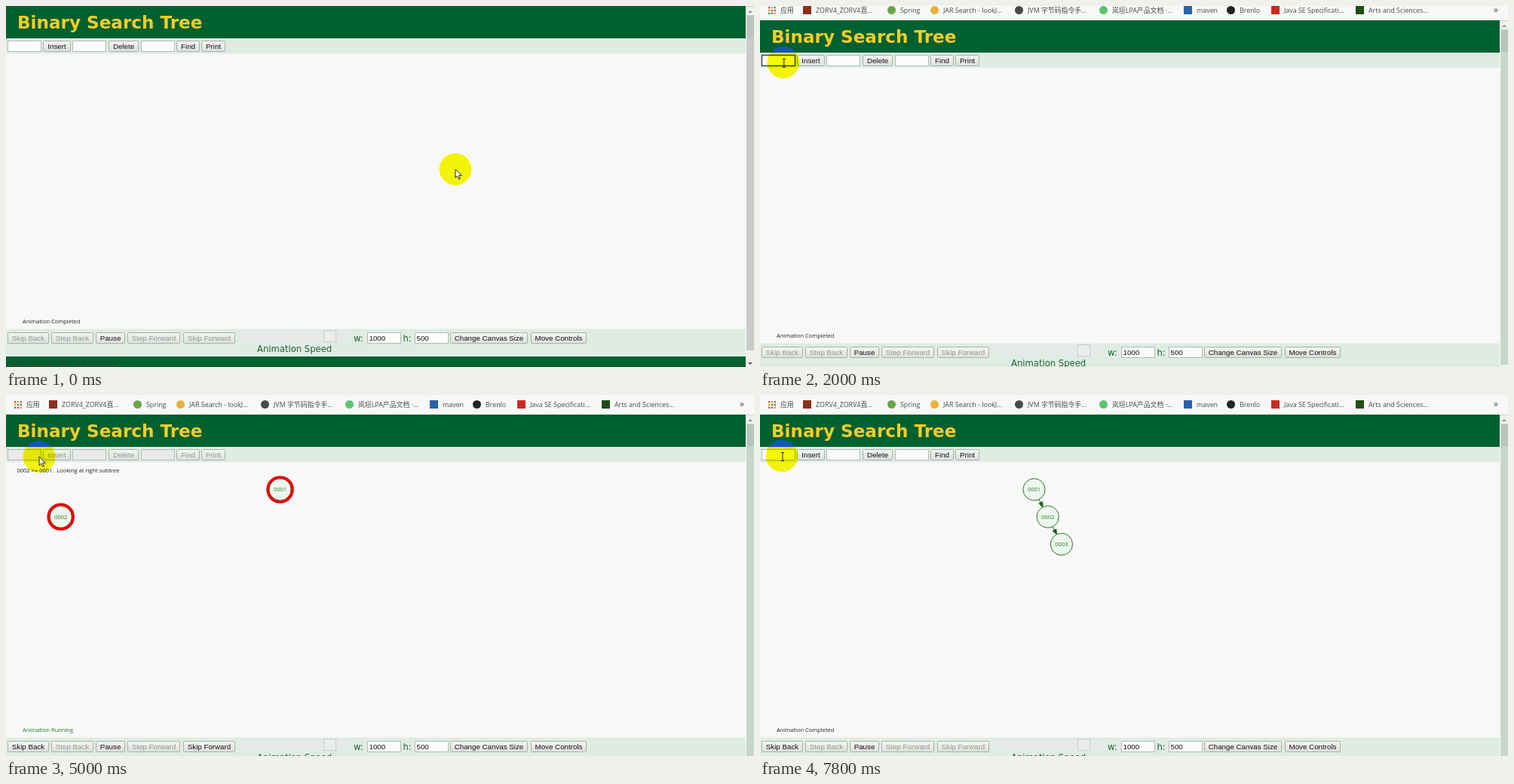
Animation, 992 px wide and 480 px high, one loop 8 s. Source, as an HTML page:

```html
<!DOCTYPE html>
<html lang="en">
<head>
<meta charset="utf-8">
<title>Binary Search Tree</title>
<style>
  html, body { margin: 0; width: 100%; height: 100%; overflow: hidden; background: #f8f8f8; }
  svg { display: block; width: 992px; height: 480px; }
  text { white-space: pre; }
  .title { font: bold 23.1px "DejaVu Sans", sans-serif; fill: #f4cd2a; }
  .label { font: 11.6px "DejaVu Sans", sans-serif; fill: #23642a; }
  .ui { font: 9.75px "Liberation Sans", Arial, sans-serif; fill: #111; }
  .mid { text-anchor: middle; }
  .small { font: 7.5px "Open Sans", sans-serif; fill: #222; }
  .mark { font: 8.9px "Open Sans", "Noto Sans CJK SC", "Noto Sans CJK", sans-serif; fill: #484848; }
  .off .ui { fill: #8f9891; }
  .node circle { fill: #ebf8eb; stroke: #35702c; stroke-width: 1; }
  .node text { fill: #35702c; text-anchor: middle; }
  .node .ring { fill: none; stroke: #df0b10; stroke-width: 4; }
  .field { fill: #fcfcfc; stroke: #b4bab5; }
  .off .field { fill: #e9eae8; }
  .field.focus { stroke: #3c4a52; stroke-width: 1.5; }
</style>
</head>
<body>
<svg viewBox="0 0 992 480">
  <defs>
    <linearGradient id="face" x2="0" y2="1">
      <stop stop-color="#f5f6f4"/><stop offset="1" stop-color="#dcdfdb"/>
    </linearGradient>
    <clipPath id="headClip"><rect y="26" width="981" height="43"/></clipPath>
  </defs>
  <g id="world"></g>
</svg>
<script>
const LOOP = 8000, STEP = 200;
const world = document.getElementById('world');

function add(tag, attrs = {}, parent = world, content = '') {
  const el = document.createElementNS('http://www.w3.org/2000/svg', tag);
  set(el, attrs);
  el.textContent = content;
  return parent.appendChild(el);
}
function set(el, attrs) {
  for (const key in attrs) el.setAttribute(key, attrs[key]);
}
const show = (el, on) => el.setAttribute('visibility', on ? 'inherit' : 'hidden');
const box = (x, y, width, height, fill) => add('rect', { x, y, width, height, fill });
const text = (x, y, cls, content, parent) => add('text', { x, y, class: cls }, parent, content);

function button(label, x1, x2, y) {
  const g = add('g');
  add('rect', { x: x1 + .5, y: y + .5, width: x2 - x1 - 1, height: 14, rx: 1,
    fill: 'url(#face)', stroke: '#a9b0aa' }, g);
  text((x1 + x2) / 2, y + 11, 'ui mid', label, g);
  return g;
}
function field(x, y, value = '') {
  const g = add('g');
  const frame = add('rect', { x: x + .5, y: y + .5, width: 44, height: 14, class: 'field' }, g);
  const label = text(x + 2.5, y + 11, 'ui', value, g);
  return { g, frame, label };
}

// Page frame
const BAR = '#dfece4';
box(0, -10, 992, 36, '#f8f8f8');
box(0, 26, 981, 43, '#00602f');
box(0, 69, 981, 20.5, BAR);
box(0, 89.5, 981, 366, '#f8f8f8');
box(0, 455.5, 981, 36, BAR);
box(0, 492, 981, 30, '#00602f');
text(15, 56, 'title', 'Binary Search Tree');
add('text', { x: 8, y: 511, class: 'label', style: 'fill:#673b1c' }, world, 'Algorithm Visualizations');

// Scroll bar
const track = box(982, 26, 10, 480, '#c8d6ca');
box(982, 27, 10, 11, '#eff2ef');
box(983, 39, 9, 29, '#b9c5bc');
add('path', { d: 'M984 35l3-3 3 3z', fill: '#8b928d' });
box(982, 484, 10, 22, '#edf0ed');
add('path', { d: 'M984 500h6l-3 3z', fill: '#555' });

// Bookmarks
for (let i = 0; i < 9; i++) {
  box(11 + i % 3 * 3.8, 8 + Math.floor(i / 3) * 3.8, 2.4, 2.4,
    ['#d9503f', '#e0a32e', '#4a9a58'][(i + Math.floor(i / 3)) % 3]);
}
text(27, 16, 'mark', '应用');
[
  [74, 'ZORV4_ZORV4直...', '#8c2f1f', 0],
  [186, 'Spring', '#6aa548', 1],
  [243, 'JAR Search - lookJ...', '#e6b43c', 1],
  [355, 'JVM 字节码指令手...', '#4a4a4a', 1],
  [467, '岚垣LPA产品文档 ·...', '#5cc470', 1],
  [579, 'maven', '#2c62a8', 0],
  [636, 'Brenlo', '#222', 1],
  [695, 'Java SE Specificati...', '#cb2a20', 0],
  [807, 'Arts and Sciences...', '#214d16', 0]
].forEach(([x, label, fill, round]) => {
  add('rect', { x: x - 17, y: 7, width: 11, height: 11, rx: round ? 5.5 : 0, fill });
  text(x, 16, 'mark', label);
});
add('text', { x: 973, y: 16, class: 'mark', style: 'font-size:12px' }, world, '»');

// Controls
const input = field(2, 72);
const topControls = [
  input.g, field(88, 72).g, field(179, 72).g,
  button('Insert', 49, 86, 72), button('Delete', 136, 176, 72),
  button('Find', 226, 257, 72), button('Print', 259, 291, 72)
];
const ROW = 460;
const skipBack = button('Skip Back', 2, 57, ROW);
const stepBack = button('Step Back', 60, 116, ROW);
button('Pause', 119, 158, ROW);
const stepForward = button('Step Forward', 161, 231, ROW);
const skipForward = button('Skip Forward', 235, 304, ROW);
button('Change Canvas Size', 589, 692, ROW);
button('Move Controls', 696, 770, ROW);
text(461, 471.5, 'label', 'w:');
text(526.5, 471.5, 'label', 'h:');
field(479, ROW, '1000');
field(542, ROW, '500');
box(311, 459, 144, 12, '#e5e9e7');
add('rect', { x: 421.5, y: 457.5, width: 16, height: 15, fill: '#ebedec', stroke: '#c6cec9' });
text(333, 485.5, 'label', 'Animation Speed');
[stepBack, stepForward].forEach(el => el.classList.add('off'));

// Tree
const R = 14.6;
const status = text(22, 448, 'small', '');
const message = text(14.5, 102.5, 'small', '');
const links = [0, 1].map(() => add('path', { stroke: '#1c5a1c', fill: '#1c5a1c' }));
const nodes = ['0001', '0002', '0003'].map(label => {
  const g = add('g', { class: 'node' });
  add('circle', { r: R }, g);
  const ring = add('circle', { r: 16.3, class: 'ring' }, g);
  text(0, 2.6, 'small', label, g);
  return { g, ring };
});
const probe = add('circle', { r: R, fill: 'none', stroke: '#007700' });

// Pointer
const halo = add('circle', { r: 21.3, fill: '#fafa08', style: 'mix-blend-mode:multiply' });
const blue = add('circle', { r: 21.3, fill: '#1154c6' }, add('g', { 'clip-path': 'url(#headClip)' }));
const click = add('circle', { r: 4.5, fill: 'none', stroke: '#e01818', 'stroke-width': 2.2 });
const arrow = add('path', { d: 'M0 0V11.5L2.7 9L4.5 13.2L6.4 12.4L4.6 8.3H8.2Z', fill: '#fff', stroke: '#222' });
const beam = add('path', { d: 'M-1-4.5H3M-1 6.5H3M1-4.5V6.5', fill: 'none', stroke: '#222' });

// Timeline tables: rows start with a time in ms
const PAN = [[963, -26], [2382, 0]];
const POINTER = [
  [200, 596, 243], [1200, 30.5, 81.5], [2400, 31, 82], [2700, 58, 81], [3000, 58, 81],
  [3400, 31, 82], [4000, 31, 82], [4300, 58, 81], [4800, 58, 82], [5000, 44, 82],
  [5200, 31, 82], [5800, 31, 82], [6100, 58, 80], [6600, 58, 80], [7000, 29, 81]
];
const START = [72.7, 162];
const PATHS = [
  [[3000, 363.5, 125.7]],
  [[4600, ...START], [5200, ...START], [5600, 381.7, 162]],
  [[6400, ...START], [7200, ...START], [7600, 399.9, 198.4]]
];
const PROBE = [[6600, 363.5, 125.7], [7000, 381.7, 162]];
const RINGS = [
  [[4800, 5200], [6600, 6800]],
  [[4800, 5200], [7000, 7200]],
  [[6600, 6800], [7000, 7200]]
];
const RUNNING = [[3000, 3200], [4600, 5600], [6400, 7600]];
const FOCUS = [[1800, 2800], [3800, 4400], [5600, 6200]];
const CLICKS = [[2800, 3000], [4400, 4600], [6200, 6400]];
const TYPED = [[0, ''], [2400, '1'], [3000, ''], [4000, '2'], [4600, ''], [5800, '3'], [6400, '']];
const compare = (a, b) => `${a} >= ${b}.\u00a0 Looking at right subtree`;
const FOUND = 'Found null tree, inserting element';
const MESSAGES = [
  [0, ''], [3000, 'Inserting 1'], [3200, ''],
  [4600, 'Inserting 2'], [4800, compare('0002', '0001')], [5200, FOUND], [5400, ''],
  [6400, 'Inserting 3'], [6600, compare('0003', '0001')], [6800, ''],
  [7000, compare('0003', '0002')], [7200, FOUND], [7400, '']
];

const within = (spans, t) => spans.some(([a, b]) => t >= a && t < b);
const latest = (rows, t) => rows.filter(row => row[0] <= t).pop()[1];
function at(rows, t, ease = k => k) {
  const i = rows.findIndex(row => row[0] > t);
  if (i === 0) return rows[0].slice(1);
  if (i < 0) return rows[rows.length - 1].slice(1);
  const a = rows[i - 1], b = rows[i];
  const k = ease((t - a[0]) / (b[0] - a[0]));
  return a.slice(1).map((v, j) => v + (b[j + 1] - v) * k);
}
const smooth = k => k * k * (3 - 2 * k);
const place = (el, [x, y]) => set(el, { transform: `translate(${x} ${y})` });

function linkPath([x1, y1], [x2, y2]) {
  const d = Math.hypot(x2 - x1, y2 - y1), ux = (x2 - x1) / d, uy = (y2 - y1) / d;
  const ex = x2 - ux * R, ey = y2 - uy * R;
  const bx = ex - ux * 6.5, by = ey - uy * 6.5;
  return `M${x1 + ux * R} ${y1 + uy * R}L${bx} ${by}L${bx - uy * 2.7} ${by + ux * 2.7}` +
    `L${ex} ${ey}L${bx + uy * 2.7} ${by - ux * 2.7}L${bx} ${by}`;
}

function render(t) {
  const running = within(RUNNING, t);
  place(world, [0, Math.round(at(PAN, t)[0])]);
  set(track, { fill: t < 1000 ? '#c9cac9' : '#c8d6ca' });

  topControls.forEach(el => el.classList.toggle('off', running));
  skipBack.classList.toggle('off', t < 3000);
  skipForward.classList.toggle('off', !running);
  input.frame.classList.toggle('focus', within(FOCUS, t));
  input.label.textContent = latest(TYPED, t);
  status.textContent = running ? 'Animation Running' : 'Animation Completed';
  status.style.fill = running ? '#1d7a2a' : '#222';
  message.textContent = latest(MESSAGES, t);

  const spots = PATHS.map(path => at(path, t));
  nodes.forEach(({ g, ring }, i) => {
    show(g, t >= PATHS[i][0][0]);
    place(g, spots[i]);
    show(ring, t >= PATHS[i][0][0] && within(RINGS[i], t));
  });
  links.forEach((link, i) => {
    show(link, t >= PATHS[i + 1][1][0]);
    set(link, { d: linkPath(spots[i], spots[i + 1]) });
  });
  show(probe, t >= 6800 && t < 7000);
  place(probe, at(PROBE, t));

  const spot = at(POINTER, t, smooth);
  [halo, blue, click, arrow, beam].forEach(el => place(el, spot));
  const typing = spot[0] < 46 && !running;
  show(beam, typing);
  show(arrow, !typing);
  show(click, within(CLICKS, t));
}

function tick() {
  render(Math.floor(performance.now() % LOOP / STEP) * STEP);
  requestAnimationFrame(tick);
}
tick();
</script>
</body>
</html>
```
